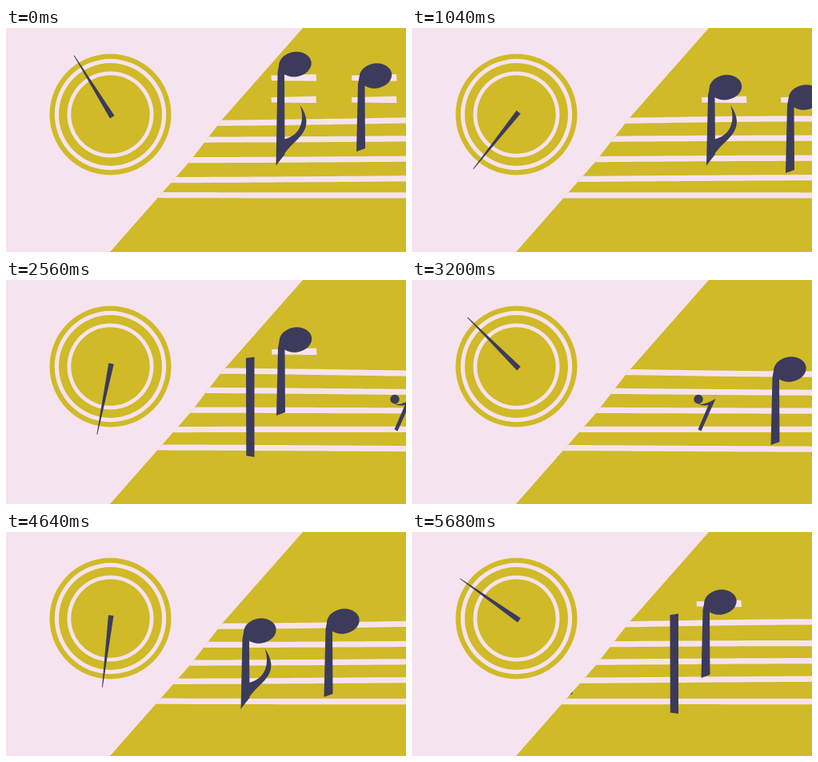
An HTML page with a canvas for the animation above (5760 ms loop, 500x281 px).

```html
<!DOCTYPE html>
<html lang="en">
<head>
<meta charset="utf-8">
<title>Notes and dial</title>
<style>
  html, body { margin: 0; height: 100%; overflow: hidden; background: #f6e3f0; }
  canvas { display: block; width: 100vw; height: 100vh; }
</style>
</head>
<body>
<canvas width="500" height="281"></canvas>
<script>
const ctx = document.querySelector('canvas').getContext('2d');
const LOOP = 5760, STEP = 80, SCROLL_PER_STEP = 16;
const PINK = '#f6e3f0', OLIVE = '#d0ba27', NAVY = '#3c3b5b';

const flagShape = new Path2D('M0 0 Q9 -14 18 -24 C30 -36 38 -42 38 -56 Q37 -66 30 -76 C36 -58 32 -38 10 -33 Z');
const restHook = new Path2D('M0 5.5 Q6 8.5 21.5 -.5 L3.5 40 L-.5 38 L12.5 7.5 Q4 9 -2 5 Z');

function polygon(color, ...points) {
  ctx.fillStyle = color;
  ctx.beginPath();
  points.forEach(p => ctx.lineTo(...p));
  ctx.closePath();
  ctx.fill();
}

function oval(color, x, y, rx, ry = rx, tilt = 0) {
  ctx.fillStyle = color;
  ctx.beginPath();
  ctx.ellipse(x, y, rx, ry, tilt, 0, 7);
  ctx.fill();
}

function at(x, y, paint) {
  ctx.save();
  ctx.translate(x, y);
  paint();
  ctx.restore();
}

// Five evenly spaced lines, each tilted and waved a little along the score.
function drawStaff(scroll) {
  ctx.strokeStyle = PINK;
  ctx.lineWidth = 7.2;
  [-0.8, 1, -1.2, -2.5, 2].forEach((tilt, i) => {
    ctx.beginPath();
    for (let x = 170; x <= 510; x += 10) {
      const pos = x + scroll;
      const wave = 2.5 / (i + 1) * Math.cos((pos - 220) / 960 * 2 * Math.PI);
      ctx.lineTo(x, 116 + 23.8 * i + tilt * (pos - 950) / 700 + wave);
    }
    ctx.stroke();
  });
}

// x is the stem's left side, y the middle of the head.
function drawNote(x, y, stem = 95, flagged = false) {
  for (let line = 90; line > y - 6; line -= 27.5)
    at(x - 6, line, () => polygon(PINK, [0, -3], [56, -4.5], [56.5, 4], [0.5, 3.5]));
  at(x, y + stem, () => {
    const foot = flagged ? -14 : -4;
    polygon(NAVY, [0, 0], [11, foot], [10.5, 12 - stem], [24, -stem], [18, -13 - stem],
      [10, -10 - stem], [4.5, -3 - stem], [2, 10 - stem]);
    if (flagged) ctx.fill(flagShape);
    oval(NAVY, 24, -stem, 20.3, 15.6, -0.15);
  });
}

function drawBar(x, y) {
  at(x, y, () => polygon(NAVY, [0.5, 0.5], [11, -1], [11, 124.5], [0.8, 123]));
}

function drawRest(x, y) {
  at(x, y, () => {
    oval(NAVY, 0, 0, 5.7);
    ctx.fill(restHook);
  });
}

function drawScore() {
  drawNote(337.5, 45.5, 127, true);
  drawNote(438, 60);
  drawNote(576, 74.5, 98, true);
  drawNote(675, 87);
  drawBar(811.5, 97.5);
  drawNote(850, 75);
  drawRest(998, 149.5);
  drawNote(1088.5, 112);
  drawNote(1221.5, 124, 98, true);
  drawNote(1325.5, 112);
  drawBar(1458, 103.5);
  drawNote(1497.5, 88);
}

function drawDial(step) {
  [76, 69.7, 64.5, 54, 49.2].forEach((r, i) => oval(i % 2 ? PINK : OLIVE, 130.5, 108.5, r));
  // The hand starts fast and loses speed.
  const degrees = -31.7 + 19.713 * step - 0.02927 * step ** 2 - 0.000545 * step ** 3;
  at(130.8, 108.5, () => {
    ctx.rotate(degrees * Math.PI / 180);
    polygon(NAVY, [-3.3, 3.8], [3.3, 3.8], [0.4, -87], [-0.4, -87]);
  });
}

function draw(step) {
  const scroll = step * SCROLL_PER_STEP;
  ctx.fillStyle = PINK;
  ctx.fillRect(0, 0, 500, 281);
  ctx.save();
  polygon(OLIVE, [500, 0], [371, 0], [270, 115], [230, 167], [130, 281], [500, 281]);
  ctx.clip();
  drawStaff(scroll);
  at(-scroll, 0, drawScore);
  ctx.restore();
  drawDial(step);
}

function tick() {
  draw(Math.floor(performance.now() % LOOP / STEP));
  requestAnimationFrame(tick);
}
tick();
</script>
</body>
</html>
```
